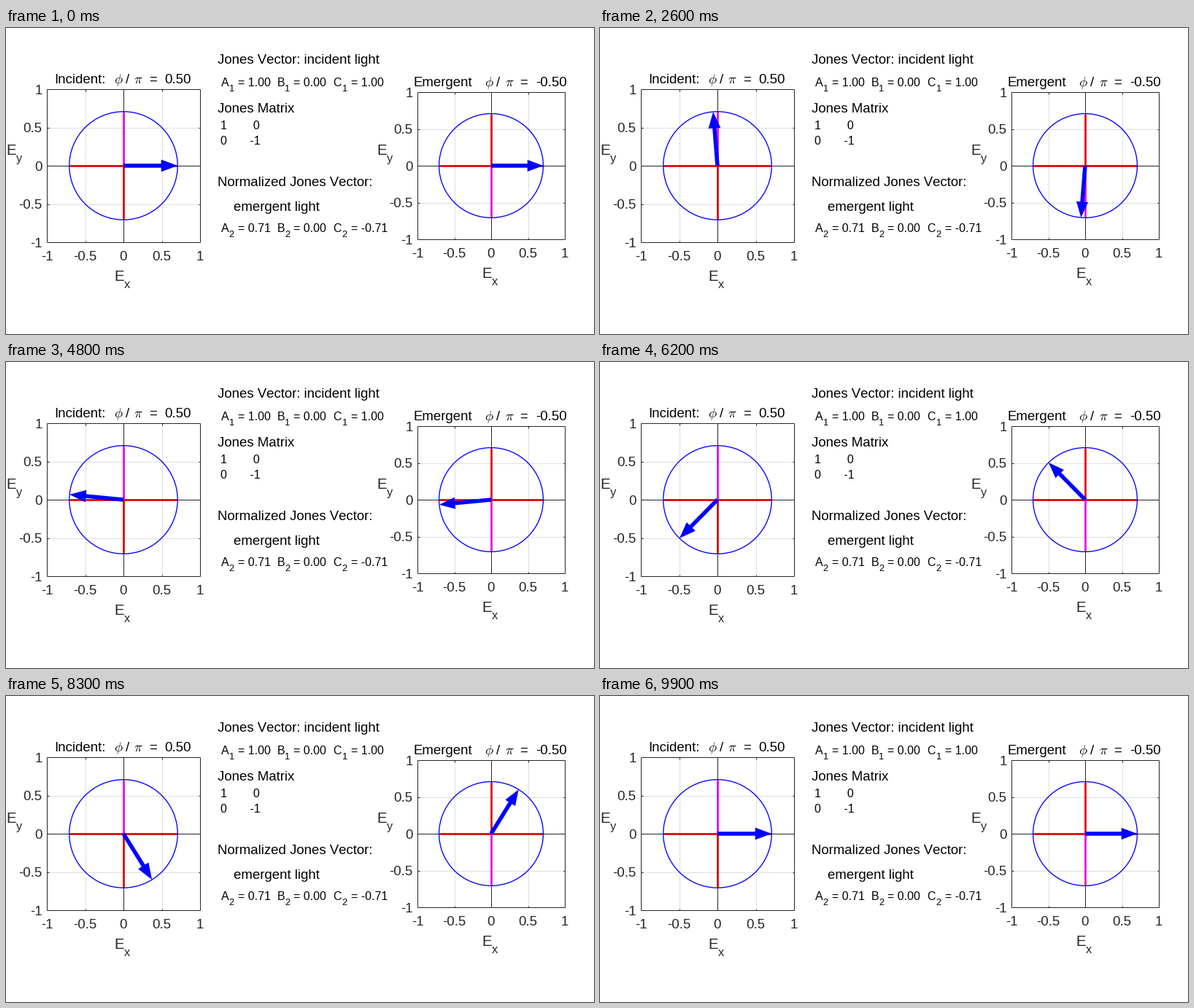
Animation, 806 px wide and 420 px high, one loop 10000 ms. Source, as a matplotlib script:

```python
import numpy as np
import matplotlib.pyplot as plt
from matplotlib.animation import FuncAnimation
from matplotlib.patches import Circle, Polygon

W, H, DPI = 806, 420, 96
FRAMES, INTERVAL = 100, 100
INK, GRID = "#262626", "#dedede"
BLUE, RED, MAGENTA = "#0000ff", "#d80000", "#e400e4"
AMP = 1 / np.sqrt(2)

plt.rcParams["font.family"] = "Liberation Sans"
plt.rcParams["mathtext.fontset"] = "cm"
plt.rcParams["text.kerning_factor"] = 6  # practically no kerning

fig = plt.figure(figsize=(W / DPI, H / DPI), dpi=DPI, facecolor="white")
ax = fig.add_axes([0, 0, 1, 1])
ax.set(xlim=(0, W), ylim=(H, 0))
ax.axis("off")


def px(width):
    return width * 72 / DPI


def line(x0, y0, x1, y1, color=INK, width=1.0, z=2):
    """Straight line, snapped to the pixel that starts at its coordinate."""
    ax.plot([x0, x1], [y0, y1], color=color, lw=px(width), zorder=z,
            solid_capstyle="butt", snap=True)


def text(x, y, s, size=14, color="black", ha="left"):
    ax.text(x, y, s, fontsize=size, color=color, ha=ha, va="baseline", zorder=8)


def axis_label(x, y, sub):
    text(x, y, "E", 15.4, INK)
    text(x + 13.7, y + 10, sub, 12.3, INK)


class Plot:
    """Square axes from -1 to 1 with a polarization circle and a field arrow."""

    def __init__(self, cx, cy, scale, up, down):
        self.cx, self.cy, self.scale = cx, cy, scale
        self.radius = AMP * scale
        self.draw_axes()
        r = self.radius
        line(cx - r, cy, cx + r, cy, RED, 2.67, 4)
        line(cx, cy, cx, cy - r, up, 2.67, 4)
        line(cx, cy, cx, cy + r, down, 2.67, 4)
        ax.add_patch(Circle((cx, cy), r, fill=False, ec=BLUE, lw=px(1.33), zorder=5))
        self.arrow = ax.add_patch(
            Polygon(self.arrow_points(0), closed=True, fc=BLUE, ec="none",
                    zorder=6, snap=False))

    def draw_axes(self):
        cx, cy, s = self.cx, self.cy, self.scale
        left, right, top, bottom = cx - s, cx + s, cy - s, cy + s
        for v in (-1, -0.5, 0, 0.5, 1):
            x, y = cx + v * s, cy - v * s
            if abs(v) == 0.5:
                line(x, top, x, bottom, GRID, z=1)
                line(left, y, right, y, GRID, z=1)
                for edge, d in ((top, 3), (bottom, -2)):
                    line(x, edge, x, edge + d)
                for edge, d in ((left, 3), (right, -2)):
                    line(edge, y, edge + d, y)
            else:
                line(x, top, x, bottom)
                line(left, y, right, y)
            text(x, bottom + 25, f"{v:g}", color=INK, ha="center")
            text(left - 6.5, y + 6.7, f"{v:g}", color=INK, ha="right")
        axis_label(cx - 12.5, bottom + 53, "x")
        axis_label(left - 56, cy - 15, "y")

    def arrow_points(self, angle):
        r, half = self.radius, 2.75
        neck, wing = r - 0.215 * self.scale, 0.08 * self.scale
        u = np.array([0, neck, neck, r, neck, neck, 0])
        v = np.array([-half, -half, -wing, 0, wing, half, half])
        c, s = np.cos(angle), np.sin(angle)
        return np.column_stack([self.cx + u * c - v * s,
                                self.cy - u * s - v * c])

    def turn(self, angle):
        self.arrow.set_xy(self.arrow_points(angle))


def title(x, y, name, x_phi, value):
    text(x, y, name)
    for dx, s in ((0, r"$\phi$"), (16, "/"), (27, r"$\pi$"), (48, "="), (69.5, value)):
        text(x_phi + dx, y, s)


def vector(y, index, values):
    for x, dx, name, value in zip((295, 371.5, 448.5), (10.7, 10.7, 12.3), "ABC", values):
        text(x, y, name, 12)
        text(x + dx, y + 7, index, 9.6)
        text(x + dx + 11.8, y, f"= {value}", 12)


incident = Plot(161, 189, 105, MAGENTA, RED)
emergent = Plot(665, 189, 101, RED, MAGENTA)

title(66, 76, "Incident:", 148, "0.50")
title(558.5, 80, "Emergent", 656.5, "-0.50")

text(289.5, 49, "Jones Vector: incident light")
vector(80, "1", ("1.00", "0.00", "1.00"))
text(289.5, 116, "Jones Matrix")
text(294.5, 139, "1" + " " * 8 + "0", 12)
text(294.5, 160, "0" + " " * 7 + "-1", 12)
text(290, 217, "Normalized Jones Vector:")
text(311.5, 251, "emergent light")
vector(280, "2", ("0.71", "0.00", "-0.71"))


def update(i):
    angle = 2 * np.pi * i / (FRAMES - 1)
    incident.turn(angle)
    emergent.turn(-angle)
    return incident.arrow, emergent.arrow


anim = FuncAnimation(fig, update, frames=FRAMES, interval=INTERVAL,
                     repeat=True, repeat_delay=0)
plt.show()
```
